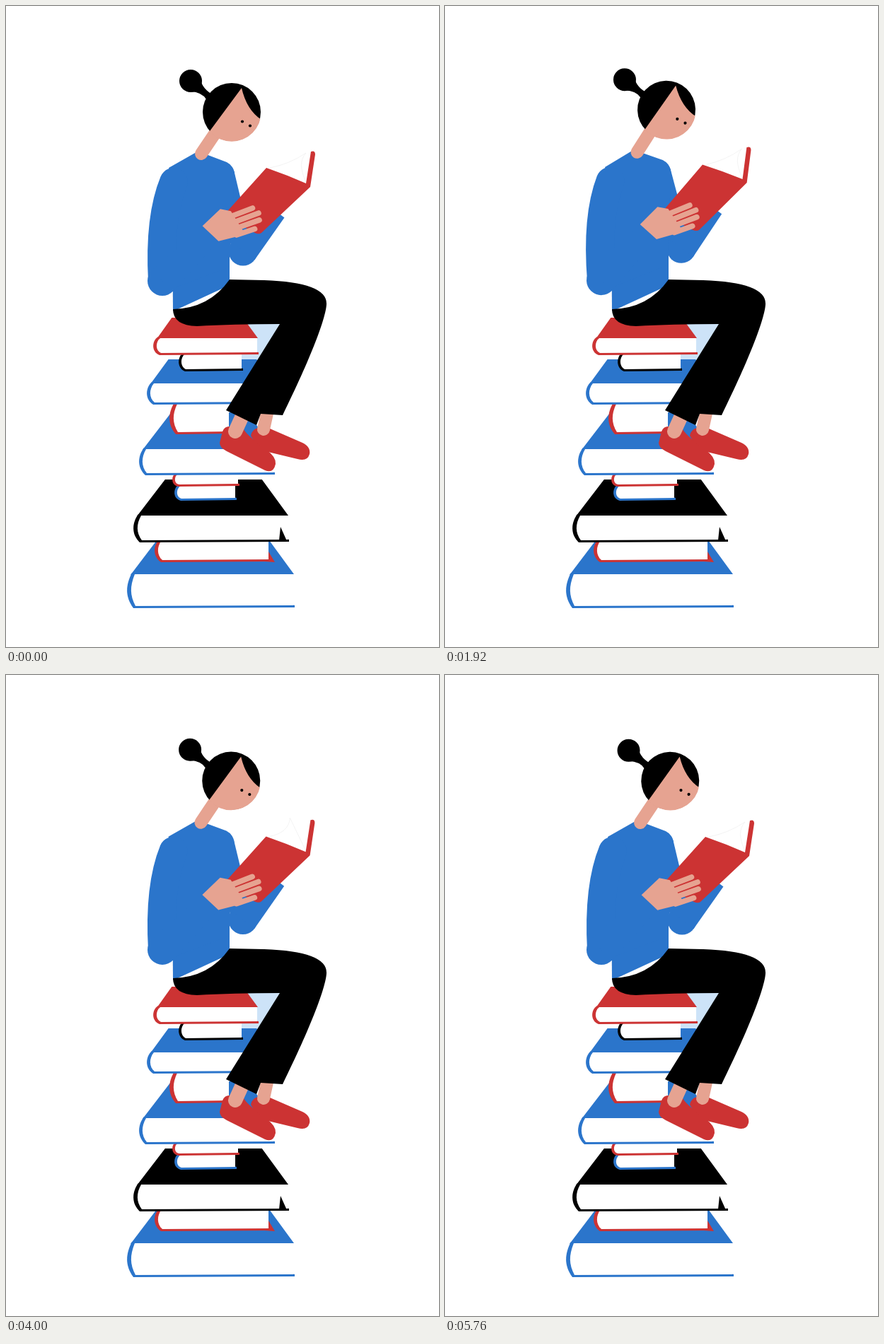
An HTML page with a canvas for the animation above (5840 ms loop, 612 by 907 pixels).

```html
<!DOCTYPE html>
<html lang="en">
<head>
<meta charset="utf-8">
<title>Reader on a stack of books</title>
<style>
html, body { margin: 0; width: 100%; height: 100%; overflow: hidden; background: #fff; }
canvas { display: block; width: 612px; height: 907px; }
</style>
</head>
<body>
<canvas id="stage" width="612" height="907"></canvas>
<script>
const ctx = document.getElementById('stage').getContext('2d');
const BLUE = '#2b75cb', RED = '#cc3333', SKIN = '#e6a391', PALE = '#cde3f8', BLACK = '#000', WHITE = '#fff';
const LOOP = 5840, STEP = 80;

const lerp = (a, b, k) => a + (b - a) * k;
const between = (a, b, k) => [lerp(a[0], b[0], k), lerp(a[1], b[1], k)];

// Eased value: 0 before start, 1 after end
function ease(t, start, end) {
  const k = Math.min(1, Math.max(0, (t - start) / (end - start)));
  return k * k * (3 - 2 * k);
}

function shape(color, path) {
  ctx.fillStyle = color;
  ctx.fill(new Path2D(path));
}

function poly(color, ...points) {
  shape(color, 'M' + points.join('L') + 'Z');
}

function dot(color, x, y, r) {
  ctx.beginPath();
  ctx.arc(x, y, r, 0, 7);
  ctx.fillStyle = color;
  ctx.fill();
}

function stroke(color, width, path) {
  ctx.lineWidth = width;
  ctx.lineCap = 'round';
  ctx.strokeStyle = color;
  ctx.stroke(new Path2D(path));
}

function turned(x, y, angle, draw, dx = 0, dy = 0) {
  ctx.save();
  ctx.translate(x + dx, y + dy);
  ctx.rotate(angle);
  ctx.translate(-x, -y);
  draw();
  ctx.restore();
}

// Tapered limb, round at a and cut straight at b
function taper(color, a, b, ra, rb) {
  const dx = b[0] - a[0], dy = b[1] - a[1], d = Math.hypot(dx, dy);
  const side = (p, r) => [p[0] - dy / d * r, p[1] + dx / d * r];
  dot(color, ...a, ra);
  poly(color, side(a, ra), side(b, rb), side(b, -rb), side(a, -ra));
}

// Lying book: white page block with a round spine, and a cover of the given depth
function lyingBook(color, x, y, right, bottom, depth = 0, spine = 5) {
  const mid = (y + bottom) / 2, inner = x + spine;
  if (depth) {
    poly(color, [x + 5, y + 1], [x + 2 + depth * .84, y - depth], [right + 1 - depth * .73, y - depth], [right + 1, y]);
  }
  shape(color, `M${x + 7} ${y - 2}C${x - 2} ${mid - 8} ${x - 3} ${mid + 8} ${x + 9} ${bottom + 1}
    L${right + 2} ${bottom}V${bottom - 3}L${x + 20} ${y}Z`);
  shape(WHITE, `M${inner + 5} ${y}C${inner - 2} ${mid - 6} ${inner - 2} ${mid + 6} ${inner + 6} ${bottom - 2}
    L${right} ${bottom - 3}V${y}Z`);
}

function stack() {
  poly(PALE, [333, 450], [388, 450], [357, 502], [333, 503]);
  lyingBook(BLUE, 171, 804, 406, 851, 46, 6);
  shape(RED, 'M366 786L371 772 380 787Z');
  lyingBook(RED, 210, 756, 371, 786);
  lyingBook(BLACK, 180, 721, 398, 758, 51, 6);
  shape(BLACK, 'M388 737L397 757 386 756Z');
  lyingBook(BLUE, 238, 679, 324, 699, 0, 4);
  lyingBook(RED, 235, 662, 328, 679, 0, 4);
  lyingBook(BLUE, 188, 627, 378, 663, 52);
  lyingBook(RED, 231, 563, 315, 605, 0, 6);
  lyingBook(BLUE, 199, 534, 378, 563, 34);
  lyingBook(BLACK, 244, 492, 333, 516, 0, 4);
  lyingBook(RED, 208, 470, 355, 493, 29);
}

function legs() {
  shape(RED, 'M346 608Q348 598 357 597L373 598 419 618Q431 624 429 634Q426 645 412 641L358 628Z');
  shape(RED, 'M302 618L306 602Q309 594 317 595L336 599Q342 609 368 628Q382 638 381 648Q378 662 366 657L312 630Q302 625 302 618Z');
  stroke(SKIN, 20, 'M334 580L324 602');
  stroke(SKIN, 18, 'M369 576L364 599');
  shape(BLACK, 'M236 429Q287 428 316 387L365 388Q453 391 453 421C453 440 430 500 391 579L360 577 354 593 311 572 387 450Q320 450 270 453Q236 452 236 429Z');
}

// Hand pointing along the x axis; open 1 spreads the fingers and lifts the thumb
function hand([x, y], angle, open) {
  ctx.save();
  ctx.translate(x, y);
  ctx.rotate(angle);
  for (let i = 0; i < 4; i++) {
    const reach = (78 - 4 * (i - 1.2) ** 2) * lerp(1, 1.08, open) - 4;
    const rise = i * 9.6 - 13.5;
    stroke(SKIN, 7.6, `M34 ${rise * .95 + open * 4}L${reach} ${rise * lerp(1, 1.25, open) + open * 3}`);
  }
  poly(SKIN, [-7, -14], [25, -28 + 17 * open], [38, -20 + 11 * open], [46, 18], [7, 14]);
  if (open) stroke(SKIN, 9, 'M14 -8L34 -24');
  ctx.restore();
}

function openBook(flip) {
  shape(WHITE, 'M368 229L412 230 424 206H433L426 253Z');
  const tip = `${lerp(424, 402, flip)} ${lerp(208, 203, flip)}`;
  stroke('#eee', .7, `M373 229Q400 224 ${tip}Q411 222 424 249`);
  shape(RED, 'M368 229Q397 239 424 251L431 206Q437 204 437 210L430 256 361 321Q356 325 345 317L306 298Z');
}

function head() {
  const x = 319, y = 150, r = 41;
  shape(BLACK, 'M274 98Q275 115 290 124L283 132Q277 122 261 121Z');
  dot(BLACK, 261, 106, 16);
  dot(BLACK, x, y, r);
  ctx.save();
  ctx.beginPath();
  ctx.arc(x, y, r + .7, 0, 7);
  ctx.clip();
  shape(SKIN, 'M333 116L285 181 320 200 370 190 361 161Q340 147 333 116Z');
  ctx.restore();
  dot(BLACK, 334, 163.5, 2.1);
  dot(BLACK, 345, 169.5, 2.1);
}

function flyingBook(t) {
  if (t < 4960) {
    const k = (t - 4560) / 400;
    turned(368, 270, -4.5 * k * k, () => openBook(0), -480 * k ** 1.5, -70 * Math.sin(k * Math.PI));
  } else if (t >= 5200) {
    const fall = Math.min(1, (t - 5200) / 200), carry = 1 - ease(t, 5400, 5680);
    turned(368, 270, -1.2 * (1 - fall), () => openBook(0), 75 * carry, -8 * carry - 300 * (1 - fall * fall));
  }
}

function render(t) {
  const sway = .3 * ease(t, 0, 1360) - 1.1 * ease(t, 1360, 2240) + .8 * ease(t, 2400, 4320);
  const near = ease(t, 4480, 4880) - ease(t, 5040, 5640);
  const far = ease(t, 4560, 4960) - ease(t, 5400, 5680);
  const look = ease(t, 4480, 4880) - ease(t, 5280, 5800);
  const flip = t > 2560 && t < 4480 ? Math.sin((t - 2560) / 960 * Math.PI) ** 2 : 0;
  const lean = draw => turned(186, 388, sway * .053, draw);

  const shoulder = [237, 249];
  const bow = between([216, 300], [206, 312], near);
  const elbow = between([221, 389], [177, 376], near);
  const wrist = between([289, 322], [254, 433], near);
  const farElbow = between([335, 347], [338, 352], far);
  const farWrist = between([380, 289], [427, 335], far);

  ctx.fillStyle = WHITE;
  ctx.fillRect(0, 0, 612, 907);
  stack();

  lean(() => {
    poly(PALE, shoulder, elbow, wrist);
    if (far > .2) hand(farWrist, lerp(-1.5, -.52, far), 1);
    taper(BLUE, [306, 238], farElbow, 17, 14);
    taper(BLUE, farElbow, farWrist, 20.5, lerp(17, 14, far));
  });
  shape(BLUE, 'M235 300H316V395L236 432Z');
  lean(() => shape(BLUE, 'M267 208L230 229 235 250V400L315 370 323 240Q322 226 312 221L283 210Z'));
  legs();

  lean(() => {
    stroke(BLUE, 40, `M${shoulder}Q${bow} ${elbow}`);
    taper(BLUE, elbow, wrist, 21, 15.5);
    stroke(SKIN, 18, `M${between([305, 166], [288, 160], look)}L276 209`);
    turned(319, 150, look * -.98, head, -44.5 * look, -11 * look);
    if (t < 4560 || t >= 5680) openBook(flip);
    else flyingBook(t);
    hand(wrist, lerp(-.35, 1.13, near), 0);
  });
}

function tick(now) {
  render(Math.floor(now % LOOP / STEP) * STEP);
  requestAnimationFrame(tick);
}
render(0);
requestAnimationFrame(tick);
</script>
</body>
</html>
```
